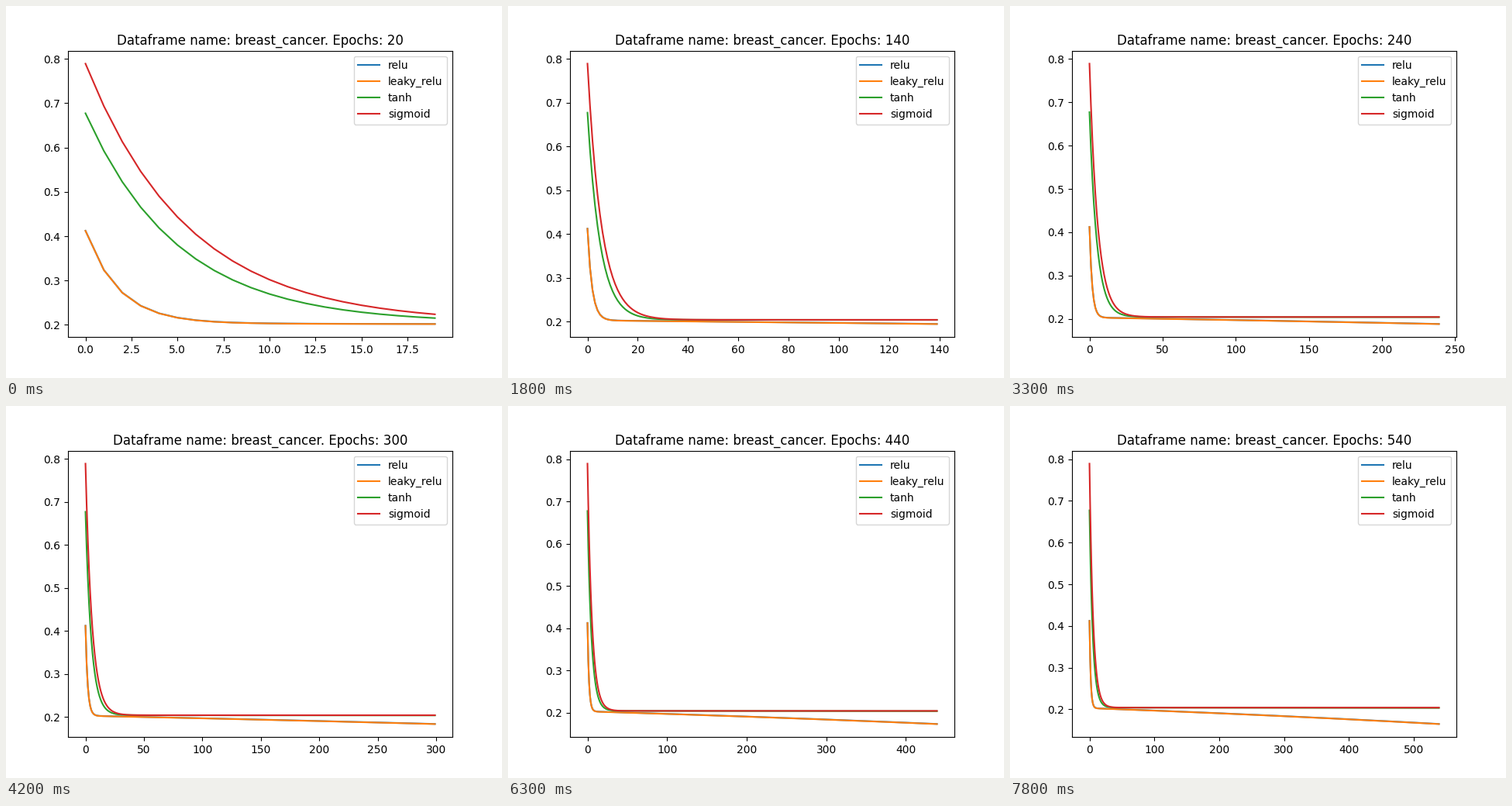
Write a matplotlib script that moves like this. It is 640x480 px and loops after 8000 ms.

```python
import numpy as np
import matplotlib.pyplot as plt
from matplotlib.animation import FuncAnimation

TICK_MS = 100
TICKS = 80
TICKS_PER_STEP = 3
EPOCHS_PER_STEP = 20


def decay(n, start, rate, floor):
    return floor + (start - floor) * rate ** n


def drift(n):
    """Slow, slightly accelerating improvement after the first drop."""
    return 5.6e-5 * n + 2.7e-8 * n ** 2


def losses(n):
    relu = decay(n, 0.4124, 0.577, 0.2031) - drift(n)
    return {
        "relu": relu,
        "leaky_relu": relu - 0.0003,
        "tanh": decay(n, 0.6773, 0.8205, 0.2042) - 1.5e-6 * n,
        "sigmoid": decay(n, 0.7893, 0.8362, 0.2042),
    }


fig, ax = plt.subplots(figsize=(6.4, 4.8), dpi=100)


def draw(tick):
    epochs = EPOCHS_PER_STEP * (tick // TICKS_PER_STEP + 1)
    n = np.arange(epochs)
    ax.clear()
    for name, loss in losses(n).items():
        ax.plot(n, loss, label=name)
    ax.set_title(f"Dataframe name: breast_cancer. Epochs: {epochs}")
    ax.legend(loc="upper right")
    return ax.lines


animation = FuncAnimation(fig, draw, frames=TICKS, interval=TICK_MS,
                          init_func=lambda: [], repeat=True, repeat_delay=0)
plt.show()
```
